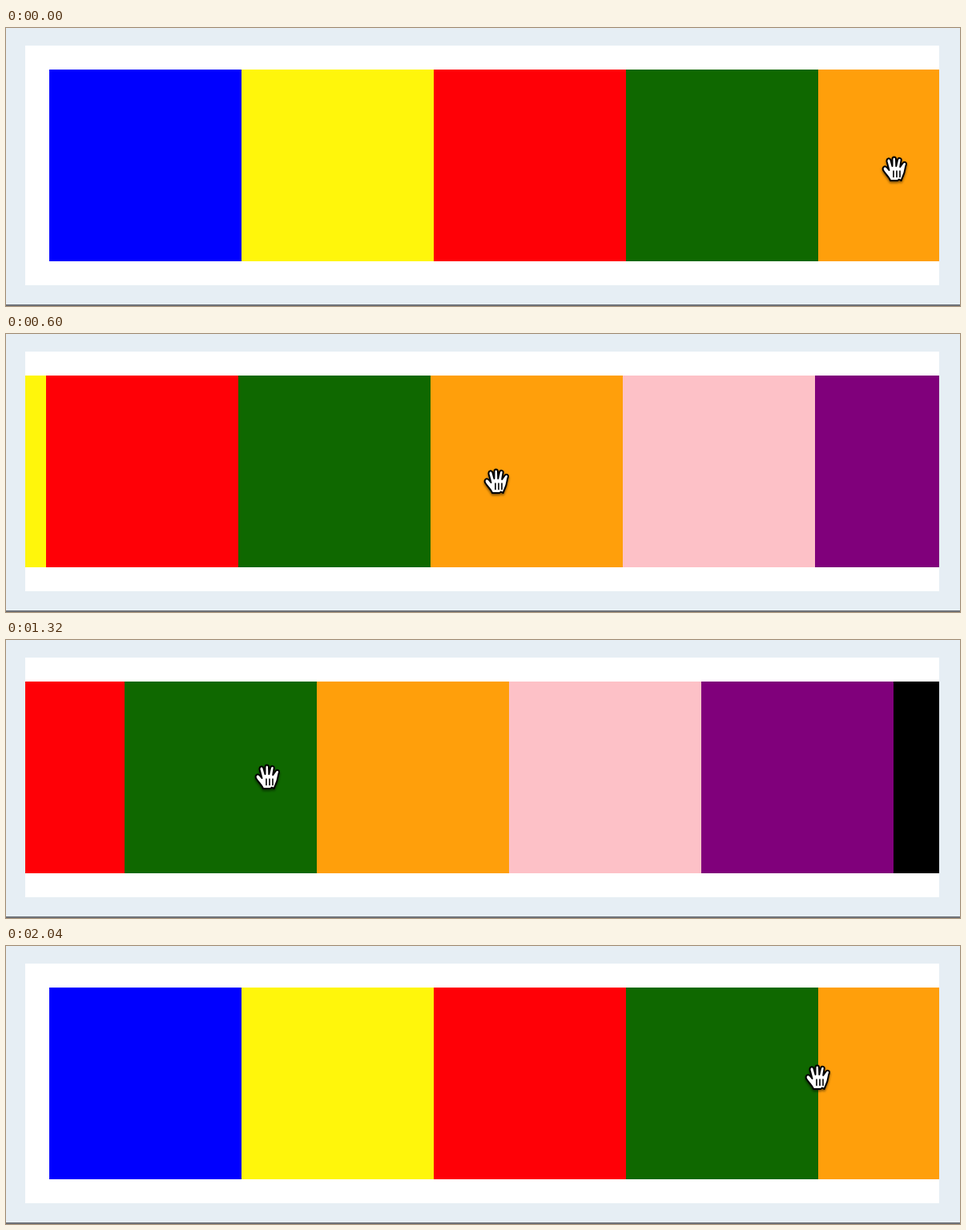
An HTML page that plays this animation: 1191x348 px, repeating every 2.07 s.

```html
<!DOCTYPE html>
<html lang="en">
<head>
<meta charset="utf-8">
<title>Drag to scroll</title>
<style>
  html, body { margin: 0; width: 100%; height: 100%; overflow: hidden; background: #e6eef4; }
  svg { display: block; width: 100%; height: 100%; }
</style>
</head>
<body>
<svg viewBox="0 0 1191 348">
  <defs>
    <clipPath id="view"><rect x="24" y="22" width="1141" height="300"/></clipPath>
    <filter id="shadow" x="-40%" y="-40%" width="180%" height="180%">
      <feDropShadow dx="0" dy="2" stdDeviation="1.5" flood-color="#000" flood-opacity=".5"/>
    </filter>
  </defs>
  <rect width="1191" height="348" fill="#e6eef4"/>
  <rect y="346" width="1191" height="2" fill="#6d7177"/>
  <rect x="24" y="22" width="1141" height="300" fill="#fff"/>
  <g clip-path="url(#view)"><g id="strip"></g></g>
  <g id="hand" stroke="#000" stroke-linejoin="round" stroke-linecap="round" filter="url(#shadow)">
    <path fill="#fff" stroke-width="2" d="M-5 14C-6 10.5-10 7-13.3 2C-16-2-12.5-5.5-9.3-2.5L-6.5 1L-9.3-9.5C-10.3-14-5.6-15.2-4.5-11.3L-2.5-4V-13C-2.5-16.5 2-16.5 2-13L2.3-4L4-11.8C5-15.5 9.3-14.5 8.6-11.3L7.2-3L10.5-7.8C12.6-10.8 16-8.5 14.7-5.6C13-1 13.5 3 11 8L8.5 14L6 12.5L4 14Z"/>
    <path fill="none" stroke-width="1.6" d="M-1 2V9.5M3 2V9.5M7 2V9.5"/>
  </g>
</svg>
<script>
const LOOP = 2070, STEP = 30, SIZE = 240, MAX_SCROLL = 919;
const colors = ['#0000ff', '#fff60b', '#ff0006', '#0f6800', '#ff9f0b', '#fdc1c7', '#80007b', '#000'];

// Pointer path: time, x, y
const path = [
  [0, 1109, 177], [270, 995, 185], [600, 612, 185], [810, 358, 179],
  [1090, 23, 177], [1320, 326, 172], [1560, 697, 177], [2040, 1013, 165]
];
// Pointer x plus scroll while dragging; it jumps once the strip has hit its end
const grip = [
  [0, 1109], [270, 1101], [600, 1096], [810, 1102], [1090, 1102],
  [1090, 942], [1320, 952], [1560, 963], [2040, 963]
];

const strip = document.getElementById('strip');
const hand = document.getElementById('hand');

colors.forEach((fill, i) => {
  const box = document.createElementNS('http://www.w3.org/2000/svg', 'rect');
  const attrs = { x: 54 + i * SIZE, y: 52, width: SIZE, height: SIZE, fill };
  for (const name in attrs) box.setAttribute(name, attrs[name]);
  strip.append(box);
});

const segment = (keys, t) => {
  let i = 0;
  while (i < keys.length - 2 && t >= keys[i + 1][0]) i++;
  return i;
};

const slope = (keys, i, c) => (keys[i + 1][c] - keys[i][c]) / (keys[i + 1][0] - keys[i][0]);

// Monotone tangent: flat at the ends and at turning points
function tangent(keys, i, c) {
  if (i === 0 || i === keys.length - 1) return 0;
  const a = slope(keys, i - 1, c), b = slope(keys, i, c);
  return a * b > 0 ? 2 * a * b / (a + b) : 0;
}

function curve(keys, t, c) {
  const i = segment(keys, t), p = keys[i], q = keys[i + 1];
  const d = q[0] - p[0], u = Math.min(1, (t - p[0]) / d), v = 1 - u;
  return v * v * (1 + 2 * u) * p[c] + u * u * (3 - 2 * u) * q[c]
    + d * u * v * (v * tangent(keys, i, c) - u * tangent(keys, i + 1, c));
}

function linear(keys, t) {
  const i = segment(keys, t);
  return keys[i][1] + slope(keys, i, 1) * (t - keys[i][0]);
}

function draw(t) {
  const x = curve(path, t, 1), y = curve(path, t, 2);
  const scroll = Math.max(0, Math.min(MAX_SCROLL, linear(grip, t) - x));
  strip.setAttribute('transform', `translate(${-Math.round(scroll)})`);
  hand.setAttribute('transform', `translate(${Math.round(x)} ${Math.round(y)})`);
}

const start = performance.now();
function tick() {
  const t = (performance.now() - start) % LOOP;
  draw(Math.floor(t / STEP) * STEP);
  requestAnimationFrame(tick);
}
tick();
</script>
</body>
</html>
```
